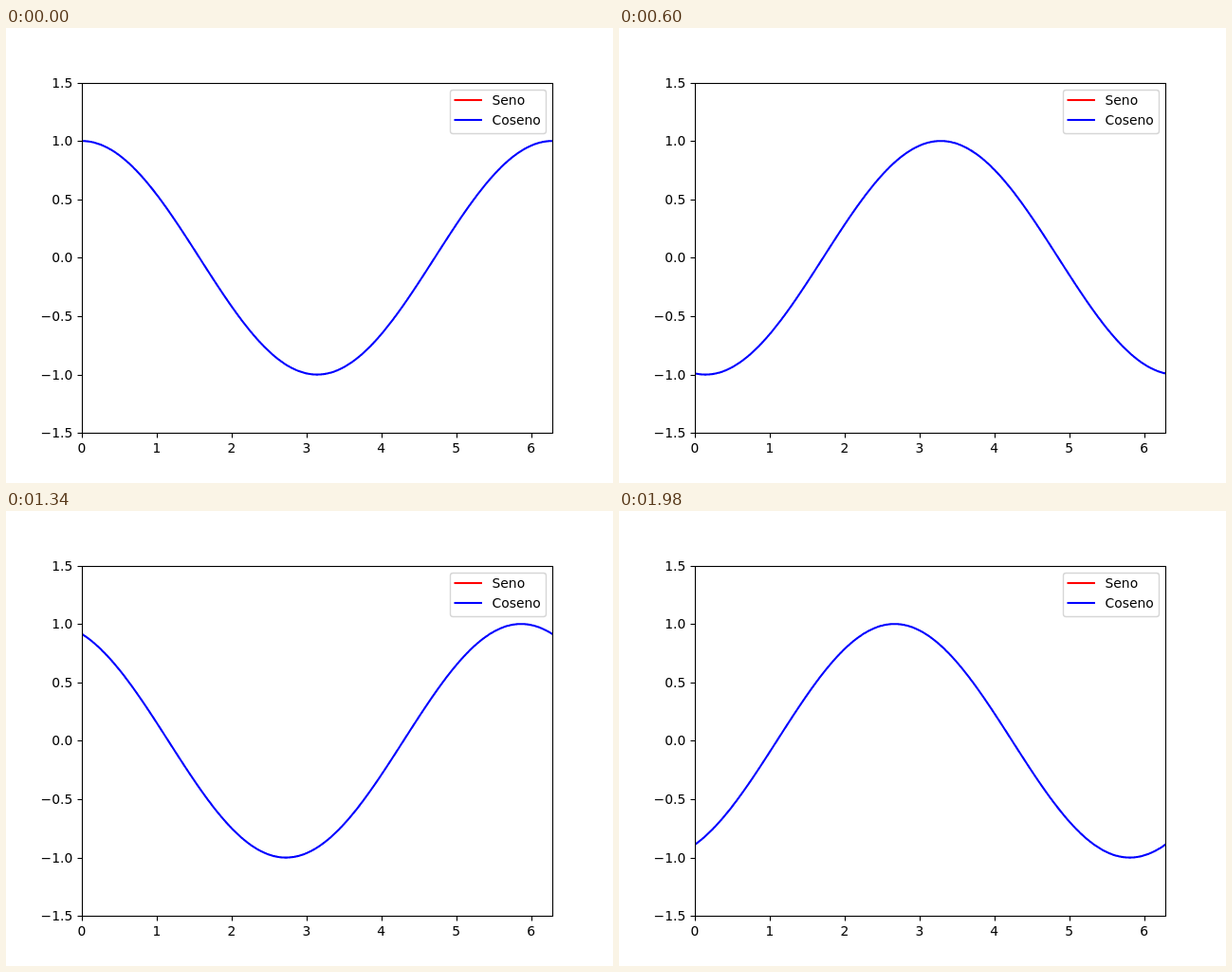
Animation of 640 by 480 pixels, one loop 2000 ms. Source, as an HTML page with a canvas:

```html
<!DOCTYPE html>
<html lang="es">
<head>
<meta charset="utf-8">
<style>
html, body { margin: 0; width: 100%; height: 100%; overflow: hidden; background: #fff; }
canvas { display: block; }
</style>
</head>
<body>
<canvas id="plot" width="640" height="480"></canvas>
<script>
const ctx = document.getElementById('plot').getContext('2d');
const LEFT = 80, RIGHT = 576, TOP = 57.6, BOTTOM = 427.2;
const STEP = 20, STEPS = 100;
const px = x => LEFT + x * (RIGHT - LEFT) / (2 * Math.PI);
const py = y => (TOP + BOTTOM) / 2 - y * (BOTTOM - TOP) / 3;
const snap = v => Math.round(v) + 0.5;

function line(x1, y1, x2, y2, color, width) {
  ctx.strokeStyle = color;
  ctx.lineWidth = width;
  ctx.beginPath();
  ctx.moveTo(x1, y1);
  ctx.lineTo(x2, y2);
  ctx.stroke();
}

function label(text, x, y, align) {
  ctx.fillStyle = '#000';
  ctx.textAlign = align;
  ctx.fillText(text, x, y);
}

function drawCurve(phase) {
  ctx.save();
  ctx.beginPath();
  ctx.rect(LEFT, TOP, RIGHT - LEFT, BOTTOM - TOP);
  ctx.clip();
  ctx.strokeStyle = '#00f';
  ctx.lineWidth = 2.083;
  ctx.lineJoin = 'round';
  ctx.beginPath();
  for (let x = -0.05; x < 6.35; x += 0.01) ctx.lineTo(px(x), py(Math.cos(x + phase)));
  ctx.stroke();
  ctx.restore();
}

function drawAxes() {
  for (let x = 0; x <= 6; x++) {
    const sx = snap(px(x));
    line(sx, 427.5, sx, 432.5, '#000', 1.11);
    label(x, px(x), 448, 'center');
  }
  for (let y = -1.5; y <= 1.5; y += 0.5) {
    const sy = snap(py(y));
    line(75.5, sy, 80.5, sy, '#000', 1.11);
    label(y.toFixed(1).replace('-', '\u2212'), 70.28, Math.round(py(y) + 5), 'right');
  }
  ctx.strokeRect(80.5, 58.5, 496, 369);
}

function drawLegend() {
  ctx.beginPath();
  ctx.roundRect(468.5, 65.5, 101, 46, 2.78);
  ctx.fillStyle = 'rgba(255,255,255,.8)';
  ctx.fill();
  ctx.strokeStyle = 'rgba(204,204,204,.8)';
  ctx.lineWidth = 1.39;
  ctx.stroke();
  [['Seno', '#f00', 76], ['Coseno', '#00f', 97]].forEach(([name, color, y]) => {
    line(472.5, y, 502, y, color, 2.083);
    label(name, 512.5, y + 5, 'left');
  });
}

function draw() {
  const step = Math.floor(performance.now() / STEP) % STEPS;
  ctx.fillStyle = '#fff';
  ctx.fillRect(0, 0, 640, 480);
  ctx.font = '13.89px "DejaVu Sans", sans-serif';
  drawCurve(step / 10);
  drawAxes();
  drawLegend();
  requestAnimationFrame(draw);
}
draw();
</script>
</body>
</html>
```
